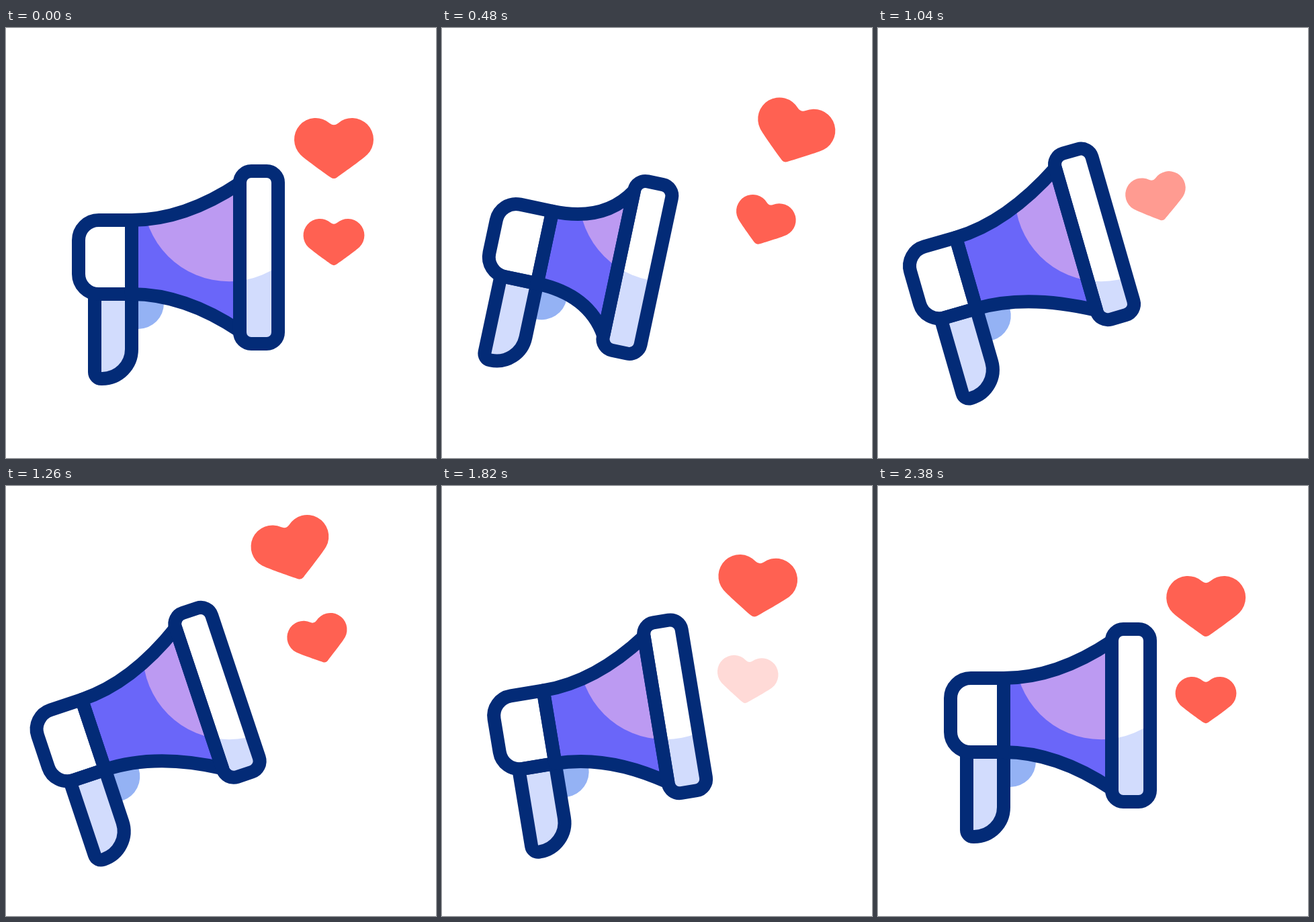
Animation, 640 px wide and 640 px high, one loop 2400 ms. Source, as an HTML page with a canvas:

```html
<!DOCTYPE html>
<html lang="en">
<head>
<meta charset="utf-8">
<title>Megaphone with hearts</title>
<style>
  html, body { margin: 0; width: 100%; height: 100%; overflow: hidden; background: #fff; }
  canvas { display: block; width: 100vmin; height: 100vmin; }
</style>
</head>
<body>
<canvas id="stage" width="640" height="640"></canvas>
<script>
const LOOP = 2400, FADE = 100;
const NAVY = '#032b77', VIOLET = '#6a66f9', LILAC = '#bc9af2',
      PALE = '#d2dcfd', SKY = '#94b2f4', RED = '#ff6152';
const ctx = document.getElementById('stage').getContext('2d');

// Key poses of the horn: pivot x, pivot y, degrees, cone stretch
const REST = [187, 396, 0, 0];
const DOWN = [141.5, 380.4, 12, -48.4];
const UP = [148.8, 424.2, -19.4, 0];
const HORN = [
  [0, ...REST],
  [310, ...DOWN],
  [740, ...DOWN],
  [1040, 146.3, 417.5, -16.1, 10],
  [1500, ...UP],
  [1820, 168.5, 413, -9.4, 0],
  [2130, ...REST]
];

// Both hearts sway as one group: x and y of the lower heart, degrees
const HOME = [488, 318.6, 0];
const SWAY = [
  [0, ...HOME],
  [220, 464, 339.8, 11.5],
  [620, 485, 269, 20],
  [760, 482, 290, 20],
  [1040, 415.4, 252.7, -14.3],
  [1270, 466, 229, -16.5],
  [1500, 403.3, 239.6, -16.5],
  [1820, 454, 288.5, 6],
  [1980, 485, 309, 11],
  [LOOP, ...HOME]
];
// Lift above the group's base, size, and the gaps: fade out at, fade in at
const HEARTS = [
  { lift: 139.6, size: 1, gaps: [[742, 1085], [1380, 1720]] },
  { lift: 0, size: 0.77, gaps: [[640, 978], [1442, 1798]] }
];

function slope(keys, i, n) {
  if (i === 0 || i === keys.length - 1) return 0;
  const rate = j => (keys[j + 1][n] - keys[j][n]) / (keys[j + 1][0] - keys[j][0]);
  const a = rate(i - 1), b = rate(i);
  return a * b <= 0 ? 0 : 2 * a * b / (a + b);
}

// Eases through the keys without overshoot and holds the last one
function pose(keys, t) {
  let i = 0;
  while (i < keys.length - 2 && t >= keys[i + 1][0]) i++;
  const p = keys[i], q = keys[i + 1], span = q[0] - p[0];
  const u = Math.min(1, (t - p[0]) / span), v = 1 - u;
  const at = n => v * v * (1 + 2 * u) * p[n] + u * u * (3 - 2 * u) * q[n]
    + span * u * v * (v * slope(keys, i, n) - u * slope(keys, i + 1, n));
  return p.slice(1).map((_, n) => at(n + 1));
}

const clamp = x => Math.min(1, Math.max(0, x));
const rotate = deg => ctx.rotate(deg * Math.PI / 180);

function disc(x, y, r, color) {
  ctx.fillStyle = color;
  ctx.beginPath();
  ctx.arc(x, y, r, 0, 2 * Math.PI);
  ctx.fill();
}

function fill(path, color) {
  ctx.fillStyle = color;
  ctx.fill(path);
}

// The highlight stays put on the stage while the shape moves under it
function fillLit(path, color, light) {
  ctx.save();
  fill(path, color);
  ctx.clip(path);
  ctx.resetTransform();
  disc(332, 249, 128.3, light);
  ctx.restore();
}

const box = new Path2D('M187 286H138A30 30 0 0 0 108 316V366A30 30 0 0 0 138 396H187Z');
const grip = new Path2D('M132 396V512A10 10 0 0 0 142 522H143A44 44 0 0 0 187 478V396Z');
const heart = new Path2D();
heart.moveTo(-6, -37.1);
heart.arc(-27, -13, 32, -0.854, 2.356, true);
heart.bezierCurveTo(-43, 16, -18, 34, -4.5, 43.5);
heart.quadraticCurveTo(0, 46.5, 4.5, 43.5);
heart.bezierCurveTo(18, 34, 43, 16, 49.6, 9.6);
heart.arc(27, -13, 32, 0.785, -2.288, true);
heart.quadraticCurveTo(0, -32.5, -6, -37.1);

function drawHorn(t) {
  const [x, y, deg, stretch] = pose(HORN, t);
  const end = 348 + stretch, rise = 0.3 * Math.max(stretch, 0);
  const cone = new Path2D(
    `M187 286Q266 286 ${end} ${231 - rise}V${451 - rise}Q266 396 187 396Z`);
  const plate = new Path2D();
  plate.roundRect(end, 213 - rise, 57, 257, 17);

  ctx.save();
  ctx.translate(x, y);
  rotate(deg);
  ctx.translate(-187, -396);
  disc(197, 410, 38, SKY);
  fill(grip, PALE);
  fill(box, '#fff');
  fillLit(cone, VIOLET, LILAC);
  fillLit(plate, PALE, '#fff');
  ctx.strokeStyle = NAVY;
  ctx.lineWidth = 20;
  ctx.lineJoin = 'round';
  for (const path of [grip, box, cone, plate]) ctx.stroke(path);
  ctx.restore();
}

function drawHearts(t) {
  const [x, y, deg] = pose(SWAY, t);
  for (const { lift, size, gaps } of HEARTS) {
    ctx.save();
    for (const [out, back] of gaps) {
      ctx.globalAlpha *= Math.max(clamp(1 - (t - out) / FADE), clamp((t - back) / FADE));
    }
    ctx.translate(x, y);
    rotate(deg);
    ctx.translate(0, -lift);
    ctx.scale(size, size);
    fill(heart, RED);
    ctx.restore();
  }
}

function frame() {
  const t = performance.now() % LOOP;
  fill(new Path2D('M0 0H640V640H0Z'), '#fff');
  drawHorn(t);
  drawHearts(t);
  requestAnimationFrame(frame);
}
frame();
</script>
</body>
</html>
```
